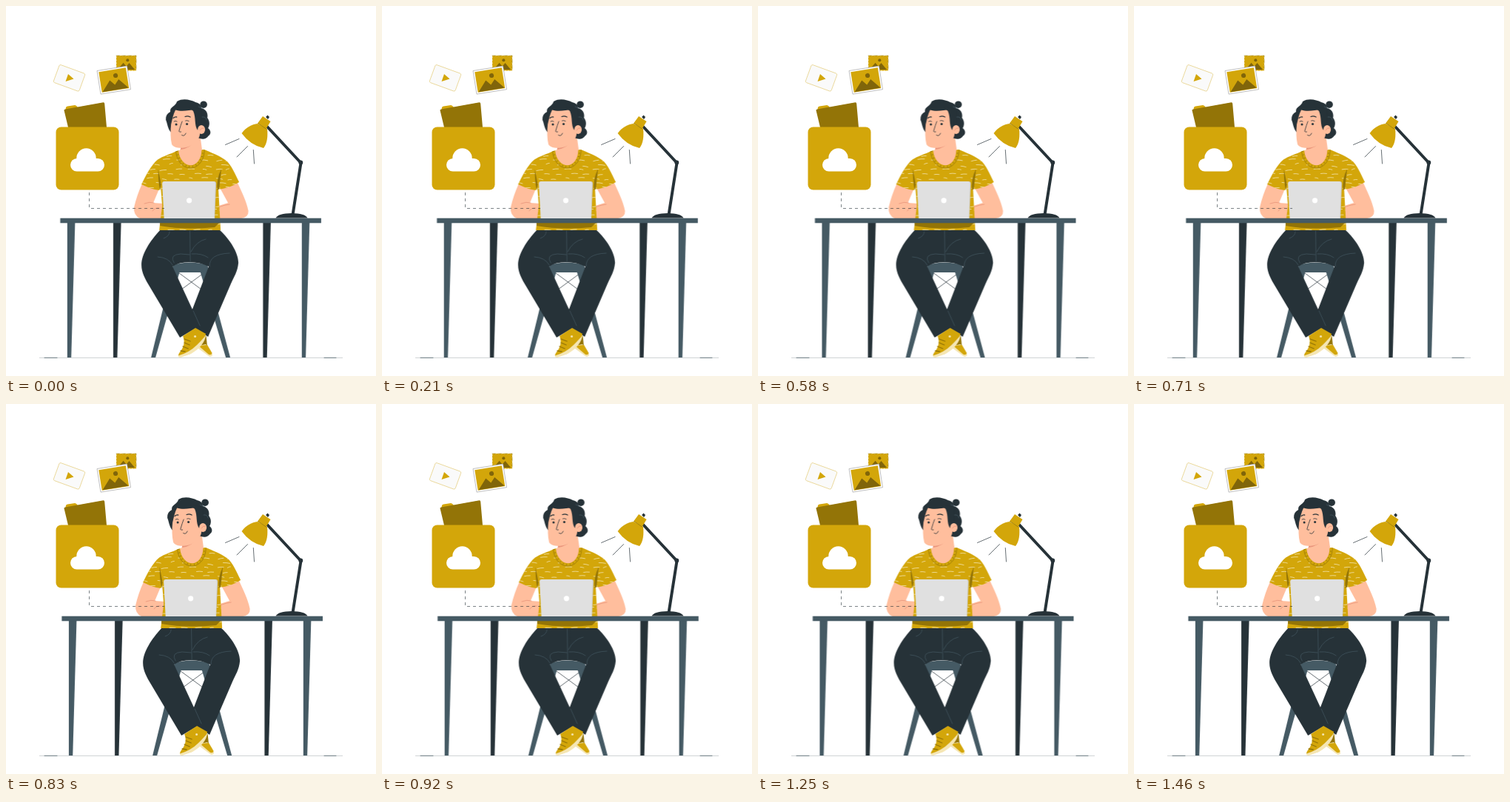
An HTML page that plays this animation: 500 by 500 pixels, repeating every 1.5 s.

```html
<!DOCTYPE html>
<html lang="en">
<head>
<meta charset="utf-8">
<title>Working at a desk</title>
<style>
  html, body { margin: 0; width: 100%; height: 100%; overflow: hidden; background: #fff; }
  svg { display: block; width: 100vw; height: 100vh; }
  #desk { animation: shake 1.5s step-end infinite; }
  .gold { fill: #d3a60a; }
  .brown { fill: #937407; }
  .dark { fill: #263238; }
  .slate { fill: #455a64; }
  .skin { fill: #ffbe9d; }
  .cream { fill: #f5e6b4; }
  .line, .fold, .blush, .seam { fill: none; stroke-linecap: round; stroke-linejoin: round; }
  .line { stroke: #263238; }
  .fold { stroke: #455a64; }
  .blush { stroke: #e58f76; }
  .seam { stroke: #937407; }
</style>
</head>
<body>
<svg viewBox="0 0 500 500" stroke-width=".7">
  <defs>
    <path id="shirt" d="M232 195.500C222 200 212 203 205 207.500C196 215 189 229 183 241C191 245 199 248 207 249L209 245L211 270L207 303H290L287 247.500C298 247 307 243 315 238C309 226 304 214 297 208.500C288 202 277 198 268 194Z"/>
    <clipPath id="shirtClip"><use href="#shirt"/></clipPath>
    <path id="leg" d="M0 293H10.500L5.300 475H0Z"/>
    <g id="scene" fill="#80650a">
      <path d="M1 25.500L13 11.500L19 18.500L25 12L36.500 25.500Z"/>
      <circle cx="21.700" cy="6.300" r="3.100"/>
    </g>
  </defs>

  <!-- ground -->
  <path fill="none" stroke="#b9c0c3" d="M45 475.400H455"/>
  <path class="fold" d="M52 475.400H69M430 475.400H446"/>

  <g id="desk"><g transform="translate(.15)">
    <!-- stool -->
    <path class="line" d="M234 361L268 386M267 361L233 386"/>
    <path class="slate" d="M225 356H235.500L202 475H196ZM261.500 356H271L303 475H297Z"/>
    <path class="slate" d="M222 360L226 350Q248 343 272 350L276 360Z"/>

    <!-- trousers -->
    <path class="dark" d="M245 303H289C302 315 314 333 314 347C313 359 308 366 304 375L273 447L253 434L251 412L274 352Q262 346 247 346Z"/>
    <path class="dark" d="M208 303H254L249 346Q233 346 225 352L262 432L235 448L194 379C188 369 183 360 183 350C183 335 195 317 208 303Z"/>
    <path class="fold" d="M248.500 304L249 345M221 305Q221 311 213 314M205 339Q220 340 225 350M227 347Q220 336 236 335L248 336M250 332Q257 318 270 315M251 335Q265 334 273 340M275 352Q274 335 302 334M253 412L262 432"/>

    <!-- shoes -->
    <path class="brown" d="M261 447L270.500 446L272 461L259 460Z"/>
    <path class="cream" d="M256 460L270 457L279 471Q279 474 275 474Z"/>
    <path class="gold" d="M260 459L272 458L278.500 469Q278 472 274 471Z"/>
    <path class="gold" d="M239 446L256 435L270 443C269 452 260 462 249 470L236 474Q231 474 234 469C241 461 242 453 239 446Z"/>
    <path class="cream" d="M270 445C269 454 262 463 250 470L236 475Q232 475 233 472.500Q248 468 258 458Q266 450 270 445Z"/>
    <path class="seam" stroke-width="1.300" d="M241 450L249 453M241 455L248 458M239 460L246 463M236 466L242 467"/>
    <circle class="cream" cx="255.500" cy="446.500" r="1.500"/>

    <!-- arms -->
    <path class="skin" d="M184 240L207 247L199 266L213 267V287H181Q172 283 173 272Q177 255 184 240Z"/>
    <path class="skin" d="M288 244L312 237C318 250 325 264 327.500 277Q328 285 318 287H281V272L300 266Z"/>
    <path class="blush" d="M187 267Q194 264 200 266M207 273Q201 272 198 277M283 275Q288 270 302 268"/>

    <!-- shirt -->
    <use href="#shirt" class="gold"/>
    <path id="flecks" clip-path="url(#shirtClip)" fill="none" stroke="#f5e6b4" stroke-width=".8" stroke-linecap="round"/>
    <path class="brown" d="M205.500 220Q205.500 236 208 249L209.500 241ZM291 220Q284 234 285.500 249L288 247ZM208 293H288L282 299Q240 303 208 297Z"/>
    <path class="skin" d="M236 187L262 173L265 195C265 208 257 216 248.500 216C240 216 234 208 233 196Q237 195 236 187Z"/>
    <path fill="none" stroke="#d3a60a" stroke-width="3.600" d="M231 196C233 208 240 217 249 217C259 217 266 207 266 195"/>
    <path class="seam" d="M229.500 197C231 210 239 219 249 219C260 219 268 208 268 195"/>
    <path class="seam" stroke-width="2.400" stroke-linecap="butt" style="stroke-linecap: butt" stroke-dasharray=".7 4" d="M231 196C233 208 240 217 249 217C259 217 266 207 266 195"/>

    <!-- head -->
    <path fill="#e9957c" d="M236 191Q248 189 255 183Q249 192 236 194Z"/>
    <path class="dark" d="M223 171C218 165 218 158 216 154Q215.500 146 222 143C221 136 229 136 231 129C239 124 250 127 256 130Q263 131 264 138C272 140 273 147 272 151C276 156 275 162 273 165C279 170 275 175 274 175C270 181 265 180 262 179Z"/>
    <circle class="dark" cx="267" cy="133.200" r="4.800"/>
    <path class="skin" d="M223 160C225 152 226 146 229 140.500C237 143 247 141 256 140L264 160L262 172C262 179 256 187 248 189.500C239 193 228 193 224 187C222 179 222 169 223 160Z"/>
    <path class="dark" d="M246 136L264 139L264 163L259 168C254 161 257 151 253 142Z"/>
    <ellipse class="skin" cx="264" cy="167" rx="5" ry="6"/>
    <path class="blush" d="M262 168Q264 164 267 165"/>
    <path class="line" stroke-width="1.300" d="M226 151.500Q228 149.500 230.500 150M242 149.500Q245.500 148 249 150"/>
    <path class="line" stroke-width=".8" d="M238 156Q236 161 234 168Q233 171 236.500 170M237.500 174.500Q241 177 243 172M227 156Q229 154.500 231 156M242.500 155Q244 154 247 155.500"/>
    <circle class="dark" cx="230" cy="160" r="1.500"/>
    <circle class="dark" cx="244.500" cy="159.500" r="1.500"/>
    <path class="fold" d="M260 136Q264 139 267 138M265 150Q270 149 271 154"/>

    <!-- table and laptop -->
    <use href="#leg" class="dark" x="145"/>
    <use href="#leg" class="dark" x="347.300"/>
    <use href="#leg" class="slate" x="82.800"/>
    <use href="#leg" class="slate" x="399.700"/>
    <rect class="slate" x="73.300" y="286.700" width="352.600" height="6.600"/>
    <path fill="#c7c7c7" d="M214 237H281Q284 237 284 240L282 287H214Z"/>
    <path fill="#e0e0e0" d="M214 237H280Q283 237 283 240L281.500 287H213.500L211 240Q211 237 214 237Z"/>
    <circle cx="247.500" cy="262.800" r="3.600" fill="#fff"/>
  </g></g>

  <!-- lamp -->
  <path class="line" stroke-width="4" d="M352 162L398.500 212L387.500 282"/>
  <circle class="dark" cx="398.300" cy="211.500" r="2.900"/>
  <path class="dark" d="M364.500 286.600Q368 280 386 280Q404 280 407.500 286.600ZM351 150L353.500 147.500L356 150L354 153Z"/>
  <path class="gold" d="M340 159L353 166C354 176 353 186 348 192Q330 188 318.500 172C324 164 332 160 340 159Z"/>
  <path class="gold" d="M347 149L357.500 156L351.500 166L340 158.500Z"/>
  <path class="seam" d="M340.500 158.500L351.500 166"/>
  <path class="line" d="M315 179.500L296.500 187.500M326.500 189.500L312 204M334.300 194.500L335.500 213"/>

  <!-- files and cloud -->
  <g transform="translate(149 67)">
    <rect class="gold" width="27" height="20.500"/>
    <use href="#scene" transform="translate(1 2) scale(.66 .67)"/>
    <rect width="27" height="20.500" fill="none" stroke="#fff" stroke-dasharray="1.500 2.500"/>
    <path class="seam" stroke-width=".5" stroke-dasharray="5 3" d="M0 0H27V20.500"/>
  </g>
  <g transform="translate(123 87.500) rotate(-9)">
    <rect width="41" height="32" fill="#fff" stroke="#a9a9a9"/>
    <rect class="gold" x="2" y="2" width="37" height="28"/>
    <use href="#scene" transform="translate(2 4)"/>
  </g>
  <rect transform="translate(72.500 79) rotate(20)" width="37" height="25.500" rx="2" fill="#fafafa" stroke="#e6cf80"/>
  <path class="gold" d="M84 92L91.500 98.500L80.500 102Z"/>
  <path class="gold" d="M80 142L81 137Q81 136 83 135.500L93 134Q95 134 97 137L130 131L132 163H85Z"/>
  <path class="brown" d="M78.500 141Q78 140 80 139.500L131.500 130.300Q133 130 133.200 132L136 164H84Z"/>
  <rect class="gold" x="67.500" y="163.500" width="85" height="85" rx="7"/>
  <g fill="#fff">
    <circle cx="108.500" cy="205.500" r="13.200"/>
    <rect x="87" y="206" width="46" height="17.600" rx="8.800"/>
  </g>
  <path fill="none" stroke="#263238" stroke-width=".6" stroke-dasharray="4 4" d="M112.500 252V273.500H214"/>
</svg>
<script>
  const DURATION = 1500, FPS = 24, LEAD = 27;
  const stops = [0, -1, 2, -4, 4, -4, 4, -4, 2, -1, 0];

  // Horizontal offset of the desk: linear between stops placed every 10 %.
  function offset(ms) {
    const p = (ms % DURATION) / DURATION * 10, i = Math.floor(p);
    return stops[i] + (stops[i + 1] - stops[i]) * (p - i);
  }

  // Hold each pose for one tick, with ticks rounded to 10 ms.
  let rules = '';
  for (let i = 0; i < DURATION * FPS / 1000; i++) {
    const ms = i * 1000 / FPS;
    const at = Math.round(ms / 10) * 1000 / DURATION;
    rules += `${at.toFixed(4)}% { transform: translateX(${offset(ms + LEAD).toFixed(3)}px) }\n`;
  }
  const style = document.createElement('style');
  style.textContent = `@keyframes shake {\n${rules}}`;
  document.head.append(style);

  // Woven flecks on the shirt.
  let seed = 11;
  const rand = () => (seed = seed * 16807 % 2147483647) / 2147483647;
  let flecks = '';
  for (let y = 201, row = 0; y < 303; y += 6.2, row++) {
    for (let x = 180 + row % 2 * 9; x < 318; x += 18) {
      const w = 4 + rand() * 5, dy = (rand() - .5) * 3;
      flecks += `M${x + rand() * 6} ${y + rand() * 3}q${w / 2} ${dy / 2 - .6} ${w} ${dy}`;
    }
  }
  document.getElementById('flecks').setAttribute('d', flecks);
</script>
</body>
</html>
```
